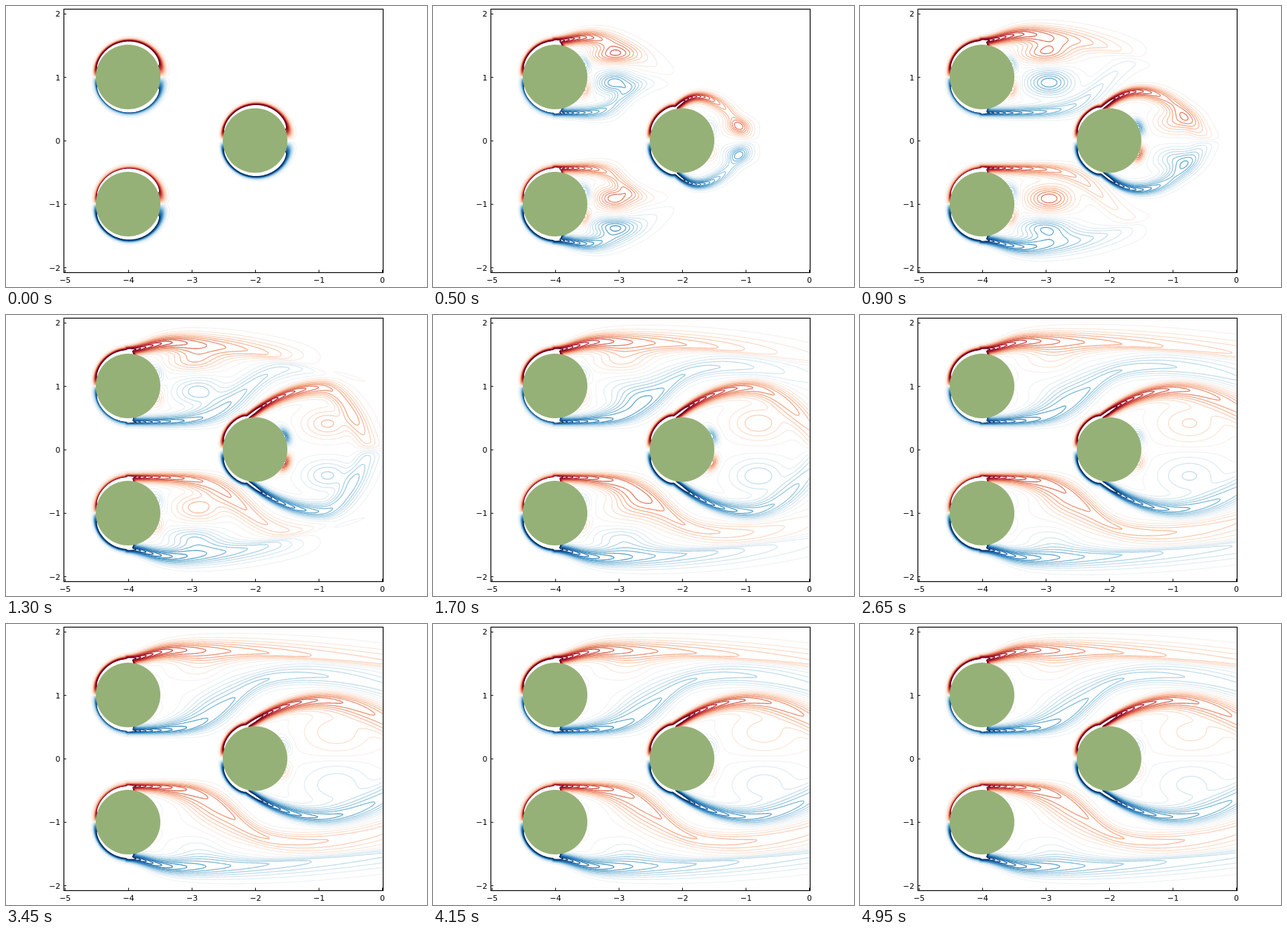
An HTML page with a canvas that plays this animation: 600x400 px, repeating every 5000 ms.

```html
<!DOCTYPE html>
<html>
<head>
<meta charset="utf-8">
<style>
html, body { margin: 0; width: 100%; height: 100%; overflow: hidden; background: #fff; }
canvas { display: block; }
</style>
</head>
<body>
<canvas id="stage" width="600" height="400"></canvas>
<script>
const ctx = document.getElementById('stage').getContext('2d');
const LEFT = 82, TOP = 4, MID = 191.5, STEP = 1.5, COLS = 304, ROWS = 126, RADIUS = 46;
const LEVELS = 15;
const back = { x: 174, y: 101, separation: 1.72 }, front = { x: 355, y: MID, separation: 1.35 };

const clamp = (v, a = 0, b = 1) => Math.min(b, Math.max(a, v));
const mix = (a, b, f) => a + (b - a) * f;
const ease = (a, b, v) => { const f = clamp((v - a) / (b - a)); return f * f * (3 - 2 * f); };
const bell = u => u * u > 20 ? 0 : Math.exp(-u * u);
const sigmoid = u => 1 / (1 + Math.exp(-u));
const approach = (t, tau) => 1 - Math.exp(-t / tau);
const decay = (t, start, tau) => Math.exp(-Math.max(0, t - start) / tau);
const growth = t => clamp(t / .9, .15, 1);

// Each shear layer gives its centre and its width above and below, at distance s behind the cylinder centre.
const outer = {
  body: back, start: 0, speed: 215,
  shape(s, t) {
    const bend = mix(.0007 / growth(t) ** 2, .00016, ease(.9, 1.9, t));
    return {
      y: 49.5 - 14 * (1 - bell(s / 42)) + bend * s * s,
      up: 4.5 + 17 * approach(Math.max(0, s), 130),
      down: 6 + 12 * bell((s - 110) / 60)
    };
  }
};
const inner = {
  body: back, start: 0, speed: 205,
  shape(s, t) {
    const q = growth(t), settled = ease(.9, 1.9, t), turn = mix(172 * q, 145, settled);
    return {
      y: 152.5 - 80 * q * sigmoid((s - turn) / (22 * q)) + .0012 * Math.max(0, s - 240) ** 2,
      up: 6 + .04 * Math.max(0, s) + 18 * settled * bell((s - turn + 32) / 45),
      down: 4.5 + .03 * Math.max(0, s) + 5 * bell((s - turn) / 50)
    };
  }
};
const lead = {
  body: front, start: -15, speed: 140,
  shape(s, t) {
    const q = growth(t), lifted = ease(.85, 1.3, t);
    const top = mix(137 - 15 * q, 103, lifted) + 5 * ease(1.8, 3.5, t), crest = mix(42 * q, 95, lifted);
    const rise = (137 - top) / crest ** 2, fall = (.0034 + .014 * bell((t - 1.3) / .35)) / q ** 2;
    return {
      y: top + (s < crest ? rise : fall) * (s - crest) ** 2,
      up: 4.5 + .06 * Math.max(0, s),
      down: 6 + .075 * Math.max(0, s)
    };
  }
};

function layerAt(layer, x, t) {
  const s = x - layer.body.x, { y, up, down } = layer.shape(s, t);
  const tilt = Math.hypot(1, layer.shape(s + 1, t).y - y);
  const reach = layer.speed * t;
  const power = 17 * Math.pow(1 + Math.max(0, s) / 45, -.66) * sigmoid((reach - s) / (20 + .1 * reach));
  return {
    y, up: up * tilt, down: down * tilt,
    power: power * ease(0, .25, t) * bell(Math.min(0, s - layer.start) / 6)
  };
}

// Starting vortices that roll up behind the cylinders and then weaken.
function vorticesAt(t) {
  const size = approach(t, .35), born = ease(0, .3, t), wide = 5 + 52 * approach(t, 1.5);
  return [
    { x: 222 + 45 * approach(t, .45), y: 66 + 22 * decay(t, 0, .3), w: 5 + 35 * size, h: 4 + 11 * size,
      power: born * (1.2 + 5.8 * decay(t, .9, .9)) },
    { x: 222 + 55 * approach(t, .45), y: 109, w: 5 + 31 * size, h: 4 + 16 * size,
      power: born * (.5 + 7.9 * decay(t, .9, .8)) },
    { x: 402 + 70 * approach(t, .8), y: mix(172, 154, ease(.5, 1.4, t)), w: wide, h: .6 * wide,
      power: born * (2.5 + 2.8 * decay(t, .9, 2)) }
  ];
}

const ridge = (p, y) => p.power * bell((y - p.y) / (y < p.y ? p.up : p.down));
const vortex = (v, x, y) => v.power * Math.exp(-(((x - v.x) / v.w) ** 2) - ((y - v.y) / v.h) ** 2);

// Vorticity attached to a cylinder, positive above its centre.
function wall(body, x, y, t, rear) {
  const dx = x - body.x, dy = y - body.y;
  const gap = Math.max(0, Math.hypot(dx, dy) - RADIUS);
  if (gap > 40) return { attached: 0, reversed: 0, clear: 1 };
  const angle = Math.atan2(Math.abs(dy), -dx), sign = dy < 0 ? 1 : -1;
  const strength = 33 * Math.pow(Math.sin(angle), angle < Math.PI / 2 ? .6 : .75);
  const thickness = (3.2 + 1.6 * angle) * mix(1, 1.15, ease(0, .6, t));
  const end = mix(3.4, body.separation, ease(0, .55, t));
  return {
    attached: sign * strength * bell(gap / thickness) * sigmoid((end - angle) / .08),
    reversed: -sign * rear * bell((angle - 2.72) / .28) * bell(gap / 8),
    clear: 1 - bell(gap / 10)
  };
}

const field = new Float32Array(COLS * ROWS);

function fillField(t) {
  const rearBack = ease(0, .5, t) * (.6 + 5 * decay(t, .9, 1));
  const rearFront = ease(.1, 1.2, t) * (2.5 + 8.5 * decay(t, 1.3, 1.1));
  const [v1, v2, v3] = vorticesAt(t);
  for (let i = 0; i < COLS; i++) {
    const x = LEFT + i * STEP;
    const [l1, l2, l3] = [outer, inner, lead].map(l => layerAt(l, x, t));
    for (let j = 0; j < ROWS; j++) {
      const y = TOP + j * STEP;
      const p = wall(back, x, y, t, rearBack), q = wall(front, x, y, t, rearFront);
      const layers = Math.max(ridge(l1, y), p.attached) - Math.max(ridge(l2, y), -p.attached)
        + Math.max(ridge(l3, y), q.attached);
      const vortices = (vortex(v1, x, y) - vortex(v2, x, y)) * p.clear + vortex(v3, x, y) * q.clear;
      field[j * COLS + i] = (layers + vortices + p.reversed + q.reversed) * Math.tanh((MID - y) / 6);
    }
  }
}

function traceContours() {
  const paths = Array.from({ length: 2 * LEVELS }, () => new Path2D());
  for (let j = 0; j < ROWS - 1; j++) for (let i = 0; i < COLS - 1; i++) {
    const n = j * COLS + i, x = LEFT + i * STEP, y = TOP + j * STEP;
    const a = field[n], b = field[n + 1], c = field[n + COLS + 1], d = field[n + COLS];
    const first = Math.max(-LEVELS, Math.ceil(Math.min(a, b, c, d) - .5));
    const last = Math.min(LEVELS - 1, Math.floor(Math.max(a, b, c, d) - .5));
    for (let k = first; k <= last; k++) {
      const v = k + .5, pts = [];
      const cross = (p, q) => (p < v) !== (q < v);
      const at = (p, q) => STEP * (v - p) / (q - p);
      if (cross(a, b)) pts.push(x + at(a, b), y);
      if (cross(b, c)) pts.push(x + STEP, y + at(b, c));
      if (cross(d, c)) pts.push(x + at(d, c), y + STEP);
      if (cross(a, d)) pts.push(x, y + at(a, d));
      for (let m = 0; m < pts.length; m += 4) {
        paths[k + LEVELS].moveTo(pts[m], pts[m + 1]);
        paths[k + LEVELS].lineTo(pts[m + 2], pts[m + 3]);
      }
    }
  }
  return paths;
}

const ramp = ['053061', '2166ac', '4393c3', '92c5de', 'd1e5f0', 'f7f7f7', 'fddbc7', 'f4a582', 'd6604d', 'b2182b', '67001f']
  .map(h => [0, 2, 4].map(i => parseInt(h.slice(i, i + 2), 16)));
const colors = Array.from({ length: 2 * LEVELS }, (_, k) => {
  const p = k / (2 * LEVELS - 1) * 10, i = Math.min(9, Math.floor(p));
  return `rgb(${ramp[i].map((v, c) => Math.round(mix(v, ramp[i + 1][c], p - i)))})`;
});

function drawAxes() {
  ctx.strokeStyle = ctx.fillStyle = '#000';
  ctx.lineWidth = 1.2;
  ctx.strokeRect(82.5, 4.5, 455, 375);
  ctx.font = '11px "DejaVu Sans", sans-serif';
  ctx.lineWidth = 1;
  ctx.beginPath();
  const label = n => n < 0 ? '\u2212' + -n : String(n);
  ctx.textAlign = 'center';
  for (let n = -5; n <= 0; n++) {
    const x = 536.5 + n * 90.45;
    ctx.moveTo(x, 379);
    ctx.lineTo(x, 375.5);
    ctx.fillText(label(n), x, 394);
  }
  ctx.textAlign = 'right';
  for (let n = -2; n <= 2; n++) {
    const y = 192 - n * 90.3;
    ctx.moveTo(83, y);
    ctx.lineTo(86, y);
    ctx.fillText(label(n), 77.5, y + 4);
  }
  ctx.stroke();
}

function draw(t) {
  fillField(t);
  const paths = traceContours();
  ctx.fillStyle = '#fff';
  ctx.fillRect(0, 0, 600, 400);
  ctx.save();
  ctx.beginPath();
  ctx.rect(82, 4, 455, 375);
  ctx.clip();
  ctx.lineWidth = 1.35;
  for (const flip of [false, true]) {
    if (flip) ctx.transform(1, 0, 0, -1, 0, 2 * MID);
    paths.forEach((path, k) => {
      ctx.strokeStyle = colors[flip ? 2 * LEVELS - 1 - k : k];
      ctx.stroke(path);
    });
  }
  ctx.restore();
  ctx.fillStyle = '#96b177';
  for (const [x, y] of [[back.x, back.y], [back.x, 2 * MID - back.y], [front.x, front.y]]) {
    ctx.beginPath();
    ctx.arc(x, y, RADIUS, 0, 2 * Math.PI);
    ctx.fill();
  }
  drawAxes();
}

let shown = -1;
function tick() {
  const frame = Math.floor(performance.now() % 5000 / 50);
  if (frame !== shown) draw((shown = frame) * .05);
  requestAnimationFrame(tick);
}
tick();
</script>
</body>
</html>
```
